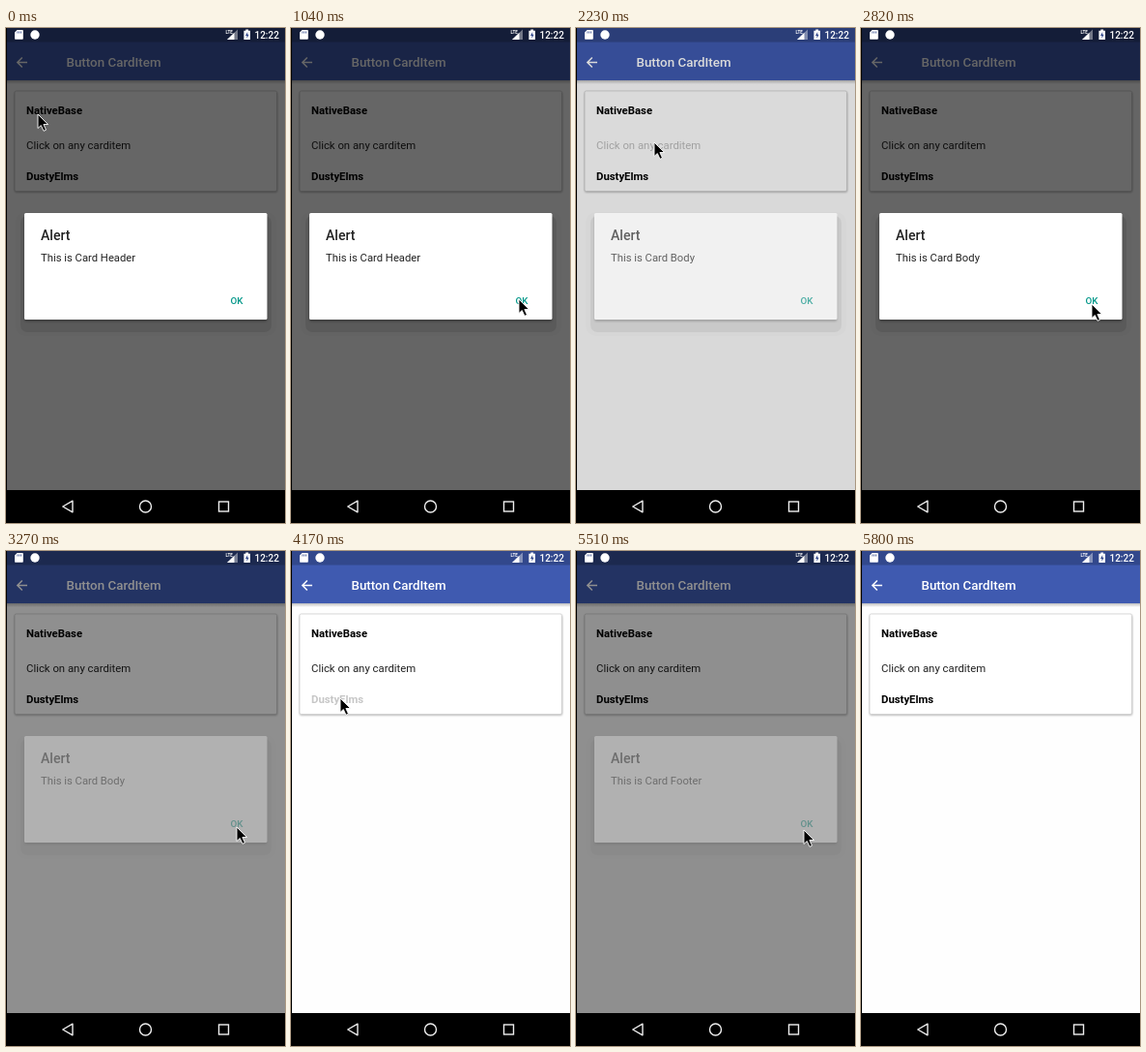
These frames come from a looping animation (289 px wide and 511 px high, 6.38 s). An HTML page:

```html
<!DOCTYPE html>
<html lang="en">
<head>
<meta charset="utf-8">
<title>Button CardItem</title>
<style>
  html, body { margin: 0; width: 100%; height: 100%; overflow: hidden; background: #000; }
  svg { display: block; width: 100vw; height: 100vh; }
  text { font-family: Roboto, sans-serif; font-size: 11.25px; fill: #222; }
  .bold { font-weight: 700; fill: #000; }
  .item { font-size: 11.35px; }
  .title { font-size: 13.37px; font-weight: 500; fill: #fff; }
  .head { font-size: 14.06px; font-weight: 500; fill: #212121; }
  .ok { font-size: 9.84px; font-weight: 500; fill: #009688; }
  .clock { font-size: 10px; font-weight: 500; fill: #fff; }
  .lte { font-size: 4.5px; font-weight: 700; fill: #fff; }
</style>
</head>
<body>
<svg viewBox="0 0 289 511">
  <defs>
    <linearGradient id="fall" x2="0" y2="1">
      <stop stop-color="#000" stop-opacity=".25"/>
      <stop offset="1" stop-color="#000" stop-opacity="0"/>
    </linearGradient>
    <filter id="blur" x="-10%" y="-10%" width="120%" height="130%"><feGaussianBlur stdDeviation="1"/></filter>
  </defs>

  <rect x="1" width="288" height="477" fill="#fefefe"/>
  <rect x="1" y="54" width="288" height="4" fill="url(#fall)"/>
  <rect x="1" y="14" width="288" height="40" fill="#3f5ab0"/>
  <rect x="1" width="288" height="14.5" fill="#32488c"/>
  <path d="M22 35.5H12M16.8 30.5l-5 5 5 5" fill="none" stroke="#fff" stroke-width="1.5"/>
  <text class="title" x="62.5" y="40">Button CardItem</text>

  <rect x="9" y="66" width="272" height="103.5" rx="1.5" opacity=".35" filter="url(#blur)"/>
  <rect x="9" y="65" width="271.5" height="103.5" rx="1.5" fill="#fff" stroke="#ccc" stroke-width=".7"/>
  <text class="item bold" x="21" y="89">NativeBase</text>
  <text class="item" id="body" x="21" y="125">Click on any carditem</text>
  <text class="item bold" id="foot" x="21" y="157">DustyElms</text>

  <rect id="dim" x="1" width="288" height="477"/>

  <g id="alert">
    <rect x="10" y="190" width="270" height="128" rx="10" opacity=".02"/>
    <rect x="15" y="194" width="260" height="120" rx="7" opacity=".09"/>
    <rect x="19" y="194" width="251.5" height="109" rx="2" opacity=".3" filter="url(#blur)"/>
    <rect x="19" y="191" width="251.5" height="110" rx="1.5" fill="#fff"/>
    <text class="head" x="36" y="219">Alert</text>
    <text id="msg" x="36" y="240.5"></text>
    <text class="ok" x="232.5" y="285">OK</text>
  </g>

  <g fill="#fff">
    <path d="M11.5 2H17a.8.8 0 0 1 .8.8V11a.8.8 0 0 1-.8.8H9.800a.8.8 0 0 1-.8-.8V4.500z"/>
    <path d="M11.900 3.500v2M13.700 3.500v2M15.500 3.500v2" stroke="#32488c" stroke-width=".8"/>
    <circle cx="30" cy="7" r="4.700"/>
    <text class="lte" x="227.500" y="5.500">LTE</text>
    <path d="M229 12L240 1.500V12z" opacity=".4"/>
    <path d="M229 12l7.500-7.200V12z"/>
    <path d="M248.300 1.500h2.800v1.200h1.900V12h-6.600V2.700h1.900z"/>
    <path d="M250.200 4l-2.200 4h1.500v2.700l2.100-4h-1.400z" fill="#32488c"/>
    <text class="clock" x="257.500" y="11">12:22</text>
  </g>

  <g fill="none" stroke="#eee" stroke-width="1.4">
    <path d="M69 488.200v11.600L58.800 494z" stroke-linejoin="round"/>
    <circle cx="144.500" cy="494" r="6"/>
    <rect x="220.500" y="489" width="10" height="10"/>
  </g>

  <path id="cursor" d="M0 0V14.500L3.300 11.500 6 17.300 8.500 16.200 5.900 10.500H10.600Z" stroke="#fff" stroke-width=".9"/>
</svg>
<script>
  const LOOP = 6380, TICK = 148.2;
  const $ = id => document.getElementById(id);
  const [body, foot, dim, alertBox, msg, cursor] =
    ['body', 'foot', 'dim', 'alert', 'msg', 'cursor'].map($);

  // Pointer stops: tick, x, y
  const stops = [
    [0, 33, 89], [7, 236, 280], [9, 236, 280], [10, 109, 118], [14, 81, 118],
    [15, 81, 118], [16, 101, 133], [19, 239, 285], [22, 239, 285],
    [26, 51, 152], [30, 51, 152], [34, 236, 288], [37, 236, 288], [38, 238, 291]
  ];
  const opening = [15, 29], closing = [9, 22, 37];
  const within = (n, a, b) => n >= a && n < b;

  function pointer(n) {
    const i = stops.findIndex(s => s[0] >= n);
    if (i < 1) return stops[i < 0 ? stops.length - 1 : 0].slice(1);
    const [a, x0, y0] = stops[i - 1], [b, x1, y1] = stops[i];
    const u = (n - a) / (b - a), e = u * u * (3 - 2 * u);
    return [x0 + (x1 - x0) * e, y0 + (y1 - y0) * e];
  }

  // Backdrop and dialog opacity
  function fade(n) {
    if (opening.includes(n)) return [.145, .65];
    if (closing.includes(n)) return [.44, .3];
    return n < 9 || within(n, 16, 22) || within(n, 30, 37) ? [.6, 1] : [0, 0];
  }

  const press = (n, at) => n === at ? .22 : n === at + 1 ? .3 : 1;

  const start = performance.now();
  function draw() {
    const n = Math.floor((performance.now() - start) % LOOP / TICK);
    const [shade, show] = fade(n);
    const [x, y] = pointer(n).map(Math.round);
    dim.setAttribute('opacity', shade);
    alertBox.setAttribute('opacity', show);
    msg.textContent = 'This is Card ' + (n < 12 ? 'Header' : n < 27 ? 'Body' : 'Footer');
    body.setAttribute('opacity', press(n, 14));
    foot.setAttribute('opacity', press(n, 28));
    cursor.setAttribute('transform', `translate(${x} ${y})`);
    cursor.setAttribute('visibility', n < 39 ? 'visible' : 'hidden');
    requestAnimationFrame(draw);
  }
  draw();
</script>
</body>
</html>
```
